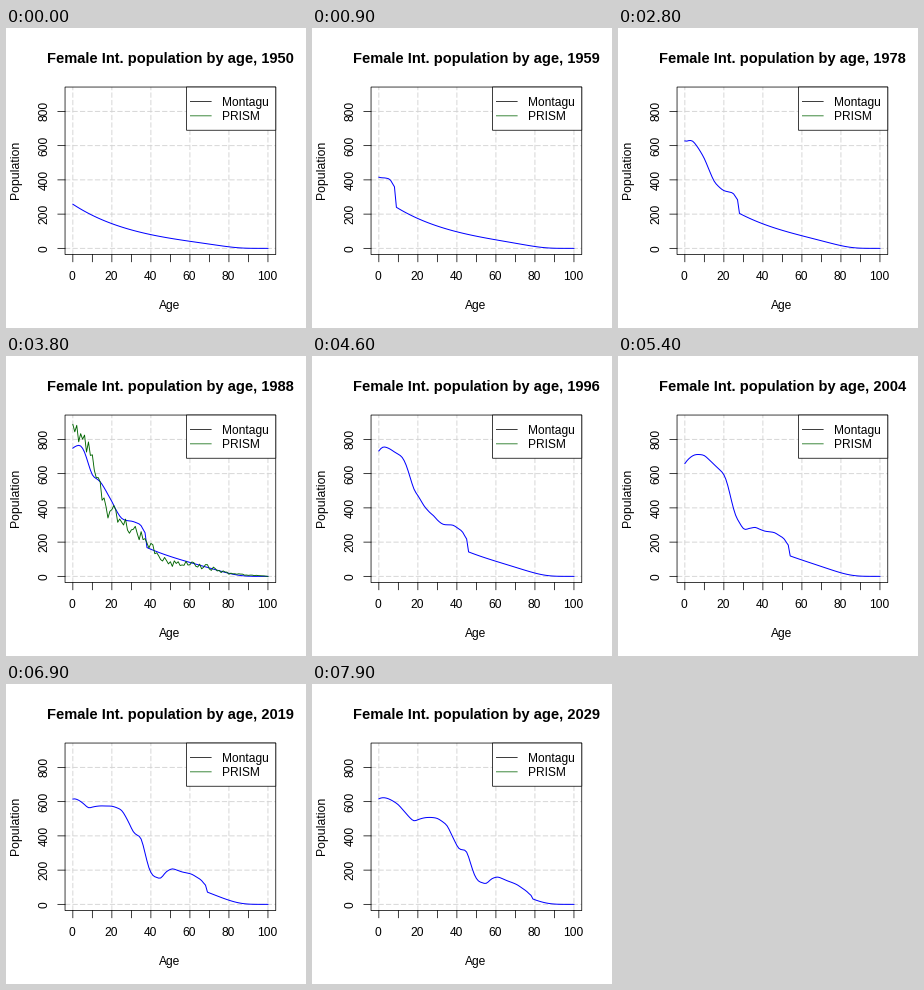
A matplotlib script for the animation above (8 s loop, 300 px wide and 300 px high).

```python
import numpy as np
import matplotlib.pyplot as plt
from matplotlib.animation import FuncAnimation
from matplotlib.patches import Rectangle

plt.rcParams["font.family"] = "Liberation Sans"
plt.rcParams["path.snap"] = False

PX = 0.72  # points per pixel at 100 dpi
LEFT, RIGHT, TOP, BOTTOM = 59.04, 269.76, 59.04, 226.56
AGES = np.arange(101)
FIRST_YEAR, YEARS = 1950, 80
SURVEY_YEAR = 1988

# Birth year, cohort size in youth, cohort size when mature
COHORTS = np.array([
    (1951, 430, 510), (1953, 478, 600), (1958, 480, 625), (1963, 525, 580),
    (1968, 655, 570), (1971, 700, 490), (1974, 735, 356), (1978, 730, 365),
    (1980, 795, 440), (1982, 865, 600), (1984, 895, 750), (1988, 880, 710),
    (1994, 880, 905), (1999, 835, 922), (2004, 775, 900), (2011, 680, 900),
    (2019, 725, 900)]).T
SURVEY_TREND = np.array([
    (0, 850), (5, 815), (8, 740), (13, 545), (17, 370), (22, 370), (26, 300),
    (31, 262), (40, 178), (48, 78), (60, 68), (70, 52), (80, 18), (100, 0)]).T


def px(age):
    return 66.84 + 1.9511 * np.asarray(age)


def py(count):
    return 220.36 - 0.1712 * np.asarray(count)


def ease(x):
    x = np.clip(x, 0, 1)
    return x * x * (3 - 2 * x)


def cohort_size(born, sizes):
    """Interpolate between the key cohorts, rounding off the corners."""
    near = [np.interp(born + d, COHORTS[0], sizes) for d in (-1, 0, 1)]
    return (near[0] + 2 * near[1] + near[2]) / 4


def population(year):
    """Each birth cohort drifts from youth to mature size and dies off with age."""
    born = year - AGES
    early = born <= FIRST_YEAR
    growth = 258 * np.exp(0.01 * (born - FIRST_YEAR))
    young = np.where(early, growth, cohort_size(born, COHORTS[1]))
    mature = np.where(early, 1.35 * growth, cohort_size(born, COHORTS[2]))
    w = ease((year - np.where(early, FIRST_YEAR, born + 15)) / 25)
    childhood = np.where(early, 1, 1 - 0.15 * np.exp(-AGES / 6))
    survival = np.exp(-0.019 * AGES - 7e-5 * np.exp(0.12 * AGES))
    return (young + (mature - young) * w) * childhood * survival


def survey():
    rng = np.random.default_rng(4)
    trend = np.interp(AGES, *SURVEY_TREND)
    noise = rng.uniform(-1, 1, len(AGES)) * (0.05 + 0.004 * AGES)
    return trend * (1 + noise)


fig = plt.figure(figsize=(3, 3), dpi=100, facecolor="white")
ax = fig.add_axes([0, 0, 1, 1])
ax.set(xlim=(0, 300), ylim=(300, 0))
ax.axis("off")


def line(xs, ys, color="black", width=0.75, **kw):
    return ax.plot(xs, ys, color=color, lw=width * PX, **kw)[0]


def label(x, y, text, size=12, **kw):
    kw = {"ha": "center", "va": "baseline", "rotation_mode": "anchor", **kw}
    return ax.text(x, y, text, fontsize=size * PX, **kw)


def frame(x, y, x2, y2, **kw):
    ax.add_patch(Rectangle((x, y), x2 - x, y2 - y, ec="black", lw=0.75 * PX, **kw))


mid_x, mid_y = (LEFT + RIGHT) / 2, (TOP + BOTTOM) / 2
dash = dict(color="lightgray", width=0.9, ls=(0, (5.8, 2.5)), zorder=1,
            dash_capstyle="butt")

for age in range(0, 101, 10):
    line([px(age)] * 2, [BOTTOM, BOTTOM + 7.2])
    if age % 20 == 0:
        line([px(age)] * 2, [BOTTOM, TOP], **dash)
        label(px(age) - 0.5, 252.2, str(age))
for count in range(0, 801, 200):
    line([LEFT, LEFT - 7.2], [py(count)] * 2)
    line([LEFT, RIGHT], [py(count)] * 2, **dash)
    label(41.8, py(count), str(count), rotation=90)

frame(LEFT, TOP, RIGHT, BOTTOM, fc="none", zorder=2)
label(mid_x - 0.5, 281, "Age")
label(13, mid_y - 1, "Population", 12.2, rotation=90)
title = label(mid_x, 35, "", 14.57, weight="bold")

model = line([], [], "blue", 1, zorder=3)
sample = line([], [], "darkgreen", 0.9, zorder=4)

frame(180.5, TOP, RIGHT, TOP + 43.2, fc="white", zorder=5)
for y, color, name in [(73.44, "black", "Montagu"), (87.84, "darkgreen", "PRISM")]:
    line([184, 205.6], [y, y], color, zorder=6, solid_capstyle="butt")
    label(216, y + 4.4, name, ha="left", zorder=6)


def draw(i):
    year = FIRST_YEAR + i
    title.set_text(f"Female Int. population by age, {year}")
    model.set_data(px(AGES), py(population(year)))
    if year == SURVEY_YEAR:
        sample.set_data(px(AGES), py(survey()))
    else:
        sample.set_data([], [])
    return title, model, sample


anim = FuncAnimation(fig, draw, frames=YEARS, interval=100, repeat=True,
                     repeat_delay=0)
plt.show()
```
